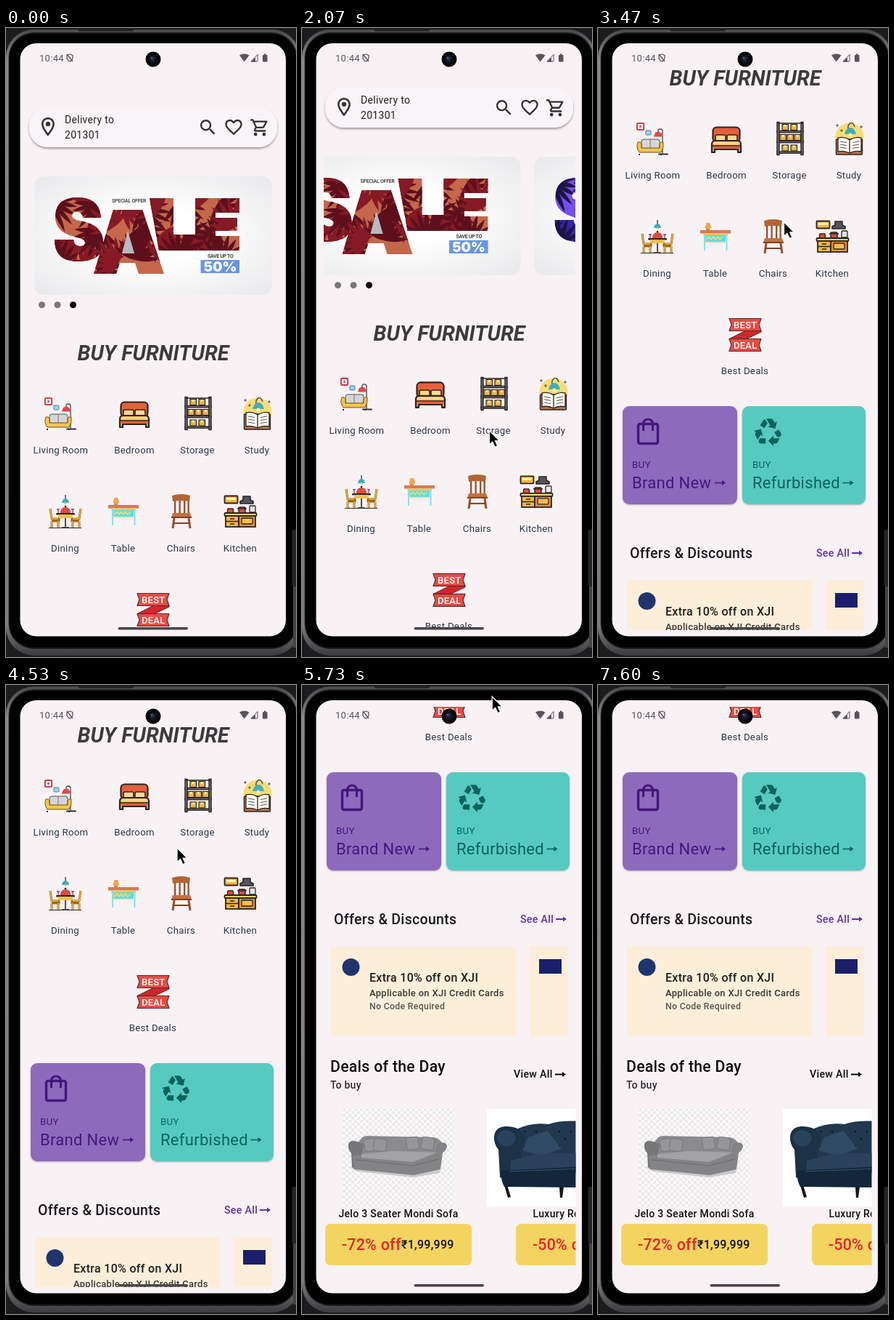
Recreate the animation shown at these times as an HTML page. Size 400x865 px, loop 7.67 s.

```html
<!DOCTYPE html>
<html lang="en">
<head>
<meta charset="utf-8">
<style>
html, body { margin: 0; width: 100%; height: 100%; overflow: hidden; background: #1c1c1e; }
svg { display: block; width: 100vw; height: 100vh; }
text { font-family: Roboto, "Noto Sans", sans-serif; letter-spacing: .3px; white-space: pre; }
</style>
</head>
<body>
<svg id="stage" viewBox="0 0 400 865"></svg>
<script>
const LOOP = 7670, STEP = 200 / 3;
const INK = '#2b2422';

const rect = (x, y, w, h, fill, r = 0, extra = '') =>
  `<rect x="${x}" y="${y}" width="${w}" height="${h}" rx="${r}" fill="${fill}" ${extra}/>`;
const box = (x, y, w, h, fill, r = 1, sw = 1.5, stroke = INK) =>
  rect(x, y, w, h, fill, r, `stroke="${stroke}" stroke-width="${sw}"`);
const shape = (d, fill, extra = '') => `<path d="${d}" fill="${fill}" ${extra}/>`;
const line = (d, stroke, w = 1.5, fill = 'none') =>
  `<path d="${d}" fill="${fill}" stroke="${stroke}" stroke-width="${w}" stroke-linejoin="round"/>`;
const dot = (x, y, r, fill, extra = '') => `<circle cx="${x}" cy="${y}" r="${r}" fill="${fill}" ${extra}/>`;
const text = (x, y, size, str, fill, weight = 400, extra = '') =>
  `<text x="${x}" y="${y}" font-size="${size}" fill="${fill}" font-weight="${weight}" ${extra}>${str}</text>`;
const group = (inner, extra = '') => `<g ${extra}>${inner}</g>`;
const icon = (x, y, scale, color, d) => shape(d, color, `transform="translate(${x} ${y}) scale(${scale})"`);
const each = (list, fn) => list.map(fn).join('');
const middle = 'text-anchor="middle"';

function random(seed) {
  return () => (seed = (seed * 16807) % 2147483647) / 2147483647;
}

const arrow = (x, y, color, w = 1.6) =>
  line(`M${x} ${y}h12`, color, w) + shape(`M${x + 10} ${y - 3.6}l5 3.6l-5 3.6z`, color);

// Palm fronds filling the sale letters
function fronds(colors) {
  const rnd = random(77);
  let out = '';
  for (let i = 0; i < 30; i++) {
    const x = 62 + (i % 10) * 28 + rnd() * 14, y = 236 + Math.floor(i / 10) * 38 + rnd() * 20;
    const turn = rnd() * 360, color = colors[1 + i % 2];
    let leaf = '';
    for (let k = -4; k <= 4; k++) {
      const len = 46 - Math.abs(k) * 3;
      leaf += shape(`M0 0Q${len / 2} -7 ${len} 0Q${len / 2} 6 0 0z`, color, `transform="rotate(${k * 18})"`);
    }
    out += group(leaf, `transform="translate(${x} ${y}) rotate(${turn})"`);
  }
  return out;
}

const banner = (id, colors) => group(
  rect(39, 204, 328, 163, 'url(#glow)', 13) +
  group(rect(60, 228, 270, 115, colors[0]) + fronds(colors), 'clip-path="url(#sale)"') +
  shape('M168 280l-8 30h17z', '#b9babd') +
  text(146, 240, 7, 'SPECIAL OFFER', '#333', 500, 'style="letter-spacing:-.25px"') +
  text(278, 316, 7, 'SAVE UP TO', '#222', 500, 'style="letter-spacing:-.3px"') +
  rect(268.5, 319, 53.5, 18, '#6795ec') +
  text(295.5, 335, 19, '50%', '#fff', 900, middle + ' style="font-family:Inter,sans-serif;letter-spacing:0"'),
  `id="${id}"`);

const PIN = 'M12 2C8.13 2 5 5.13 5 9c0 5.25 7 13 7 13s7-7.75 7-13c0-3.87-3.13-7-7-7zM7 9c0-2.76 2.24-5 5-5s5 2.24 5 5c0 2.88-2.88 7.19-5 9.88C9.92 16.21 7 11.85 7 9zM9.5 9a2.5 2.5 0 1 1 5 0a2.5 2.5 0 1 1-5 0z';
const LENS = 'M15.5 14h-.79l-.28-.27C15.41 12.59 16 11.11 16 9.5 16 5.91 13.09 3 9.5 3S3 5.91 3 9.5 5.91 16 9.5 16c1.61 0 3.09-.59 4.23-1.57l.27.28v.79l5 4.99L20.49 19zM9.5 14C7.01 14 5 11.99 5 9.5S7.01 5 9.5 5 14 7.01 14 9.5 11.99 14 9.5 14z';
const HEART = 'M16.5 3c-1.74 0-3.41.81-4.5 2.09C10.91 3.81 9.24 3 7.5 3 4.42 3 2 5.42 2 8.5c0 3.78 3.4 6.86 8.55 11.54L12 21.35l1.45-1.32C18.6 15.36 22 12.28 22 8.5 22 5.42 19.58 3 16.5 3zM12 18.65C7.14 14.24 4 11.39 4 8.5 4 6.5 5.5 5 7.5 5c1.54 0 3.04.99 3.57 2.36h1.87C13.46 5.99 14.96 5 16.5 5c2 0 3.5 1.5 3.5 3.5 0 2.89-3.14 5.74-8 10.15z';
const CART = 'M15.55 13c.75 0 1.41-.41 1.75-1.03l3.58-6.49c.37-.66-.11-1.48-.87-1.48H5.21l-.94-2H1v2h2l3.6 7.59-1.35 2.44C4.52 15.37 5.48 17 7 17h12v-2H7l1.1-2zM6.16 6h12.15l-2.76 5H8.53zM5 20a2 2 0 1 1 4 0a2 2 0 1 1-4 0zM15 20a2 2 0 1 1 4 0a2 2 0 1 1-4 0z';
const RECYCLE = 'M5.77 7.15 7.2 4.78l1.03-1.71c.39-.65 1.33-.65 1.72 0l1.48 2.46-2.23 3.68zM21.72 12.97l-1.6-2.66-3.46 2L18.87 16H20c.76 0 1.45-.43 1.79-1.11.28-.6.28-1.3-.07-1.92zM16 21h1.5c.76 0 1.45-.43 1.79-1.11L20.74 17H16v-2l-4 4 4 4zM10 17H5.7l-.84 1.41c-.3.5-.32 1.12-.06 1.65.28.57.87.94 1.52.94H10zM6.12 14.35l1.73 1.04L6.48 9.9 1 11.27l1.7 1.02-.41.69c-.35.59-.38 1.31-.07 1.92l1.63 3.26zM17.02 5.14l-1.3-2.17C15.35 2.37 14.7 2 14 2h-3.53l3.12 5.2-1.72 1.03 5.49 1.37 1.37-5.49z';

const searchBar =
  rect(32, 108, 342, 56, '#f9f4f7', 26, 'filter="url(#drop)"') +
  icon(42.6, 120.4, 1.28, '#333', PIN) +
  text(81, 131, 14, 'Delivery to', '#222') + text(81, 152, 14, '201301', '#222') +
  icon(264.5, 122.6, 1.17, '#333', LENS) + icon(300, 122.3, 1.17, '#333', HEART) + icon(336, 122.8, 1.17, '#333', CART);

const living =
  box(54, 509, 9, 9, '#fff', 1, 2.2, '#d9404c') + rect(57, 512, 3, 3, '#b96a88') +
  box(66, 519, 7, 6, '#9cd3ee', 1, 1, '#587a99') +
  line('M83 521v-2q0-2 3-2t3 3v31', '#444', 1.3) + rect(83, 550.5, 14, 2, '#333', 1) +
  shape('M77 527.5q1-7 6-7t6 7z', '#e2474b') +
  box(60, 531, 25, 13, '#d5d5d9', 3, 1, '#555') + line('M72 531v13', '#777', 1) +
  line('M57 551v2M87 551v2', INK, 2) +
  line('M55 535q5-1 5 4v4h25v-4q0-5 5-4q1 8-3 14h-30q-5-7-2-14z', '#6d5018', 1, '#f4c54a');

const bedroom =
  box(158.5, 514.5, 37, 20, '#e5613c', 5, 2.2) +
  box(162, 525, 14, 9, '#ffd98a', 2, 1.6) + box(178, 525, 14, 9, '#ffd98a', 2, 1.6) +
  line('M157 549v-11q0-5 5-5h30q5 0 5 5v11h-4v-4h-32v4z', INK, 2.2, '#f2a23c') +
  rect(158.5, 534.5, 37, 4, '#f8d58b', 2) + line('M157 540h40', INK, 1.6) + rect(159, 541, 36, 3, '#e5613c');

const storage =
  each([509.5, 523.5, 538], (y, i) => each(i == 1 ? [251, 261, 271] : [254, 266],
    x => box(x, y + 1, 8.5, 8, '#edb63f', 0, 1.2) + rect(x + 3, y + 1.5, 2.5, 3, '#fff0be')) +
    box(247, y + 10, 36, 2.2, '#8a8790', 0, 1.4)) +
  each([247, 280], x => box(x, 507.5, 3, 45, '#6f6c76', 0, 1.4)) + line('M248 509h34', INK, 1.6);

const study =
  dot(347, 528, 19.5, '#f9dc75') +
  each([[330, 512], [363, 514], [336, 519]], p => line(`M${p[0] - 2} ${p[1]}h4m-2-2v4`, '#444', .9)) +
  line('M345 518q-1-7 3-9t6 5', '#4b5358', 1.5) + shape('M340 524q2-9 8-9t8 9z', '#41b0b5') +
  dot(348, 525, 2.5, '#fff6bd') +
  box(328.5, 531, 36, 21, '#b5744c', 1, 1.4) +
  line('M331 529q9-2 16 3q8-5 16-3v19q-9-2-16 2q-8-4-16-2zM347 532v18', INK, 1.3, '#fffdf4') +
  each([534, 538, 542], y => line(`M334 ${y}l9 1.5m8 0l9-1.5`, '#555', 1));

const chairSide = flip => group(
  line('M61 661l2 14h10v3h-10M63 678v9M72 678v9', '#9c671b', 3) +
  line('M61 661l2 14h9M63 678v9M72 678v9', '#f3ba42', 1.5),
  flip ? 'transform="translate(164) scale(-1 1)"' : '');
const dining =
  line('M82 642v6', INK, 1.2) + shape('M77 653q1-6 5-6t5 6z', '#35aebf') + dot(82, 653.5, 1.5, '#f4cb4a') +
  shape('M75 667q0-8 7-8t7 8z', '#df4b3c') + dot(82, 658, 1.3, INK) +
  line('M72 661v6M92 661v6M70 662h4m16 0h4', '#617', 1) +
  rect(69, 667, 26, 2.5, INK, 1) + rect(72, 669, 20, 5, '#f4c052') + line('M82 674v12M77 687h10', INK, 1.6) +
  chairSide(false) + chairSide(true) + line('M59 687.5h45', INK, 1);

const table =
  shape('M149.5 646h4.5l2.5 7.5h-9z', '#f3a24b') + rect(149, 653.5, 5, 2.5, '#d98650') +
  rect(141, 656, 42, 4.5, '#dc7850') + rect(145, 660.5, 34, 2.5, '#ffc94d') +
  rect(148, 663, 28, 9, '#62dbe2') + line('M150 669l3-4l3 4l3-4l3 4l3-4l3 4l4-4', '#f4e26e', 1.3) +
  line('M147 661v23M177.5 661v23', '#74dce4', 1.7) + line('M149 661v12h27', '#f0d47b', 1);

const chair =
  shape('M229 643q13-4 25 0l-1 8q-11-2-23 0z', '#b36435') +
  each([232, 238.5, 245, 250.5], x => rect(x, 650, 2.3, 18, '#9a4f2a')) +
  shape('M230 667h24l2 6h-28z', '#c17240') + rect(228, 672, 28, 2, '#84421f') +
  line('M232 674l-2 14M252 674l2 14', '#9a4f2a', 3) + line('M231 681h22', '#84421f', 2);

const kitchen =
  box(301.5, 643.5, 18, 10, '#f6b63c', 1, 1.8) + rect(304, 646, 13, 3, '#fff3c6') +
  line('M323 654v-3l4-2v-5h10v5l4 2v3z', INK, 1.6, '#54545c') +
  box(305.5, 661, 8, 6, '#df4b3c', 1, 1.3) + box(321, 659, 9, 8, '#df4b3c', 1, 1.5) + line('M319 661h13', INK, 1.5) +
  box(336, 657, 8, 9, '#e6e6e6', 1, 1.3) +
  box(301.5, 667, 44, 4, '#ffd477', 1, 1.8) +
  box(303, 671, 18, 15, '#f6b63c', 0, 1.8) + line('M303 678.5h18M309 675h6M309 682h6', INK, 1.5) +
  box(321, 671, 23, 15, '#e98e3c', 0, 1.8) + box(325, 674, 15, 8, '#f2c14e', 1, 1.3);

const ribbon = y => line(`M181 ${y}h44l-3 8.5l3 8.5h-44l3-8.500z`, '#572a27', 1.2, '#e94c45');
const badge =
  line('M181 805.500L203 794.500H225V796L204 806z', '#572a27', 1, '#d0262b') +
  ribbon(777.5) + ribbon(805.5) +
  each([['BEST', 791], ['DEAL', 819]], w => text(203.3, w[1], 13, w[0], '#fff', 500, middle));

const label = (x, y, str) => text(x, y, 13.2, str, '#2c3742', 400, middle);
const grid = living + bedroom + storage + study + dining + table + chair + kitchen + badge +
  label(75.5, 585, 'Living Room') + label(177, 585, 'Bedroom') + label(264, 585, 'Storage') + label(346, 585, 'Study') +
  label(81.5, 720, 'Dining') + label(161.5, 720, 'Table') + label(241.5, 720, 'Chairs') + label(323, 720, 'Kitchen') +
  label(202.5, 854, 'Best Deals');

const buyCards =
  rect(34, 898, 158, 135, '#8e6bbc', 9, 'filter="url(#soft)"') + rect(199, 898, 170, 135, '#56cac1', 9, 'filter="url(#soft)"') +
  box(55.5, 922.5, 27, 27, 'none', 2.5, 3.4, '#43177c') +
  line('M62.500 932v-10a6.500 6 0 0 1 13 0v10', '#43177c', 3.2) +
  icon(213.2, 911.6, 1.8, '#0b635c', RECYCLE) +
  text(47, 983, 13.3, 'BUY', '#43177c') + text(213, 983, 13.3, 'BUY', '#0b635c') +
  text(47, 1011, 22, 'Brand New', '#43177c') + text(213, 1011, 22, 'Refurbished', '#0b635c') +
  arrow(161, 1003.5, '#43177c') + arrow(337.5, 1003.5, '#0b635c');

const offers =
  text(44, 1107, 19.5, 'Offers &amp; Discounts', '#1c1a1e', 500) +
  text(301, 1105, 14.2, 'See All', '#6230ab', 500) + arrow(350, 1100, '#6230ab', 2) +
  rect(40, 1137, 256, 124, '#fdeeda') + rect(314, 1137, 53, 124, '#fdeeda') +
  dot(67.5, 1166, 12, '#20356f') + rect(327, 1155, 31, 20, '#1b1f6b') +
  text(93, 1186, 16, 'Extra 10% off on XJI', '#201d1c', 500) +
  text(93, 1206, 13, 'Applicable on XJI Credit Cards', '#3a3634', 500) +
  text(93, 1224, 12.3, 'No Code Required', '#5a5552', 500);

const pillow = ([x, y, turn]) => group(box(x, y, 17, 17, '#96969a', 3, .8, '#737377'),
  `transform="rotate(${turn} ${x + 8} ${y + 8})"`);
const graySofa =
  rect(56, 1361, 154, 134, 'url(#checks)') +
  shape('M66 1441L76 1447L153 1455L190 1449V1444z', '#c8c8ca') +
  shape('M77 1409q4-10 12-11l92 2q9 1 13 9l-8 22H80z', '#8b8b8e') +
  shape('M64 1409q2-5 9-4l12 4l-2 16l-11 18l-3-2l-1-19q-5-5-4-13z', '#77777a') +
  shape('M70 1425l17-1l66 8l32-13q-1-11 6-12q9-1 9 6q-1 5-6 8l-3 23l-37 8l-82-8z', '#848487') +
  shape('M82 1423l45-4l59 2l-33 13l-71-6z', '#a3a3a6') + line('M74 1431l79 8l36-9', '#6b6b6e', 1) +
  each([[86, 1402, -8], [99, 1402, 5], [144, 1400, -7], [165, 1400, 8]], pillow);

let tufts = '';
for (let i = 0; i < 16; i++) tufts += dot(307 + (i % 6) * 16 + (i > 5 && i < 12 ? 8 : 0), 1392 + Math.floor(i / 6) * 10, 1.2, '#0c1624');
const navySofa =
  rect(255, 1361, 130, 134, '#fff') +
  shape('M283 1466l5 16l-4 1l-5-17zM355 1468h6l-2 15h-3z', '#141418') +
  shape('M298 1388q20-9 42-6q20-7 60-3v70h-108z', '#22384f') + tufts +
  shape('M265 1398q2-12 15-13q18-1 25 10q5 10-2 19l-3 37l-20 8l-7-4l-2-38q-7-8-6-19z', '#1d3147') +
  shape('M269 1400q3-10 13-10q11 1 13 12q-2 10-12 11q-12-1-14-13z', '#2a435c') +
  shape('M311 1400l28-9l19 25l-29 10l-24-8z', '#304a65') +
  shape('M288 1433q32-14 97-11v21l-97 3z', '#2a435b') +
  shape('M275 1446l110-6v29l-106-1q-5-8-4-22z', '#14263a') + line('M286 1447l100-4', '#3a546d', 1);

const priceCard = (x, off, price) =>
  rect(x, 1519, 202, 57, '#f4d461', 7) + text(x + 23, 1555, 21.3, off, '#f11f2b', 500) +
  text(x + 105, 1553, 16, price, '#111', 500);
const deals =
  text(39, 1310, 21.2, 'Deals of the Day', '#0c0b0d', 500) + text(39, 1333, 14, 'To buy', '#2e2b30', 500) +
  text(292, 1318, 14.2, 'View All', '#0c0b0d', 500) + arrow(349, 1313.5, '#0c0b0d', 2) +
  group(graySofa + navySofa +
    text(133, 1510, 14, 'Jelo 3 Seater Mondi Sofa', '#111', 500, middle) + text(318.5, 1510, 14, 'Luxury Rest Sofa', '#111', 500) +
    priceCard(32, '-72% off', '₹1,99,999') + priceCard(295, '-50% off', '₹89,999'), 'clip-path="url(#shelf)"');

const page = searchBar +
  group(banner('red', ['#c4674b', '#5d101c', '#861a26']) + banner('violet', ['#7550ee', '#1d1546', '#3a22a4']), 'clip-path="url(#carousel)"') +
  each([49.5, 71, 92.5], x => dot(x, 380.7, 4.5, '#777', 'class="dot"')) +
  text(203, 457, 28.8, 'BUY FURNITURE', '#3b3a3c', 700, middle + ' font-style="italic" style="letter-spacing:0"') +
  grid + buyCards + offers + deals;

const statusBar =
  text(46, 45.5, 13, '10:44', '#56535a') +
  line('M84 37.5l4-1.5l4 1.5v3.5q0 3-4 5q-4-2-4-5zM84 36l8 10', '#56535a', 1.3) +
  shape('M322 37.5q6.5-4 13.5 0l-6.8 9z', '#56535a') +
  line('M338 46h9v-9.5z', '#56535a', 1) + shape('M338 46.5l6-6v6z', '#56535a') +
  rect(354, 37, 6.5, 9.5, '#56535a', 1) + rect(356, 35.5, 2.5, 2, '#56535a') +
  dot(203, 43, 10.5, '#060608') + dot(203, 43, 6, '#11131f') + dot(202, 42, 3, '#262b4a') + dot(201, 41, 1, '#6873a8');

const phone =
  rect(0, 2, 405, 861, 'url(#rim)', 38) + rect(3.5, 6, 398, 848, '#1b1b1d', 35) + rect(5, 8, 395, 844, '#020203', 33) +
  rect(100, 1.5, 76, 3, '#232325', 1) + rect(396, 768, 5, 84, '#444447') + rect(394.5, 690, 8, 78, '#242426', 2) +
  rect(19.5, 21, 366.5, 815.5, '#f8f2f5', 22);

document.getElementById('stage').innerHTML = `<defs>
  <radialGradient id="glow" r=".75"><stop offset=".3" stop-color="#fff"/><stop offset="1" stop-color="#e6e6e9"/></radialGradient>
  <linearGradient id="rim" x2="0" y2="1"><stop offset="0" stop-color="#4a4a4c"/><stop offset=".05" stop-color="#8a8a8c"/><stop offset=".95" stop-color="#7c7c7f"/><stop offset="1" stop-color="#3c3c3e"/></linearGradient>
  <filter id="drop" x="-5%" y="-20%" width="110%" height="150%"><feDropShadow dx="0" dy="2" stdDeviation="1.6" flood-opacity=".38"/></filter>
  <filter id="soft" x="-5%" y="-5%" width="110%" height="112%"><feDropShadow dx="0" dy="1" stdDeviation="1" flood-opacity=".3"/></filter>
  <pattern id="checks" width="8" height="8" patternUnits="userSpaceOnUse">${rect(0, 0, 8, 8, '#fcfafb') + rect(0, 0, 4, 4, '#ebe9ea') + rect(4, 4, 4, 4, '#ebe9ea')}</pattern>
  <clipPath id="sale"><path d="M131 261h-25q-1-8-8-8q-7 0-7 5q0 5 10 7q33 5 33 30q0 26-35 26q-32 0-32-30h26q1 9 9 9q7 0 7-5q0-5-11-7q-30-6-30-28q0-27 31-27q30 0 32 28z"/>
    <path clip-rule="evenodd" d="M148 250h40l30 88h-35l-5-15h-21l-5 15h-31zM168 280l-8 30h17z"/>
    <path d="M198 234h33v50h31v22h-51z"/><path d="M261 234h61v20h-33v7h30v18h-30v7h33v20h-61z"/></clipPath>
  <clipPath id="carousel">${rect(30, 200, 347, 172, '#fff')}</clipPath>
  <clipPath id="shelf">${rect(19, 1340, 358.5, 260, '#fff')}</clipPath>
  <clipPath id="view">${rect(19, 30, 367, 798, '#fff')}</clipPath>
</defs>` + phone +
  group(group(page, 'id="page"'), 'clip-path="url(#view)"') +
  statusBar + rect(154.5, 824, 96.5, 3.5, '#49464b', 1.7) +
  '<path id="cursor" d="M0 0v19.5l4.5-4l3.3 7.3l3.7-1.6l-3.3-7h6z" fill="#000" stroke="#fff" stroke-width="1.3"/>';

const el = id => document.getElementById(id);
const dots = document.querySelectorAll('.dot');
const inOut = p => p * p * (3 - 2 * p);
const out = p => 1 - (1 - p) ** 3;
const steady = p => p;

// Tracks are lists of [time, value, easing into that value]
function at(track, t) {
  const i = track.findIndex(k => k[0] > t);
  if (i < 0) return track[track.length - 1][1];
  if (i == 0) return track[0][1];
  const [t0, v0] = track[i - 1], [t1, v1, ease = inOut] = track[i];
  return v0 + (v1 - v0) * ease((t - t0) / (t1 - t0));
}

const scrollY = [[1900, 0], [2733, 260], [3350, 378, out], [4534, 378], [5000, 677, steady], [5500, 778, out]];
const cursorX = [[900, 410], [1500, 242, out], [1850, 255], [2733, 277], [4100, 240], [4534, 236], [5000, 272], [5350, 276], [6067, 251]];
const cursorY = [[900, 800], [1500, 552, out], [1534, 552], [1850, 594], [2733, 326], [3000, 290, out], [4100, 230], [4534, 224], [5000, 78, steady], [5350, 50, out], [6067, -12], [6200, -40, steady]];
const slide = [[1900, 0], [2500, 1]];

function draw(time) {
  const t = Math.floor((time % LOOP + 4) / STEP) * STEP;
  const s = at(slide, t);
  el('page').setAttribute('transform', `translate(0 ${-at(scrollY, t)})`);
  el('red').setAttribute('transform', `translate(${-347 * s} 0)`);
  el('violet').setAttribute('transform', `translate(${347 * (1 - s)} 0)`);
  dots.forEach((d, i) => d.setAttribute('fill', i == (s < .5 ? 2 : 0) ? '#000' : '#777'));
  el('cursor').setAttribute('transform', `translate(${at(cursorX, t)} ${at(cursorY, t)})`);
}

const start = performance.now();
function tick() {
  draw(performance.now() - start);
  requestAnimationFrame(tick);
}
tick();
</script>
</body>
</html>
```
